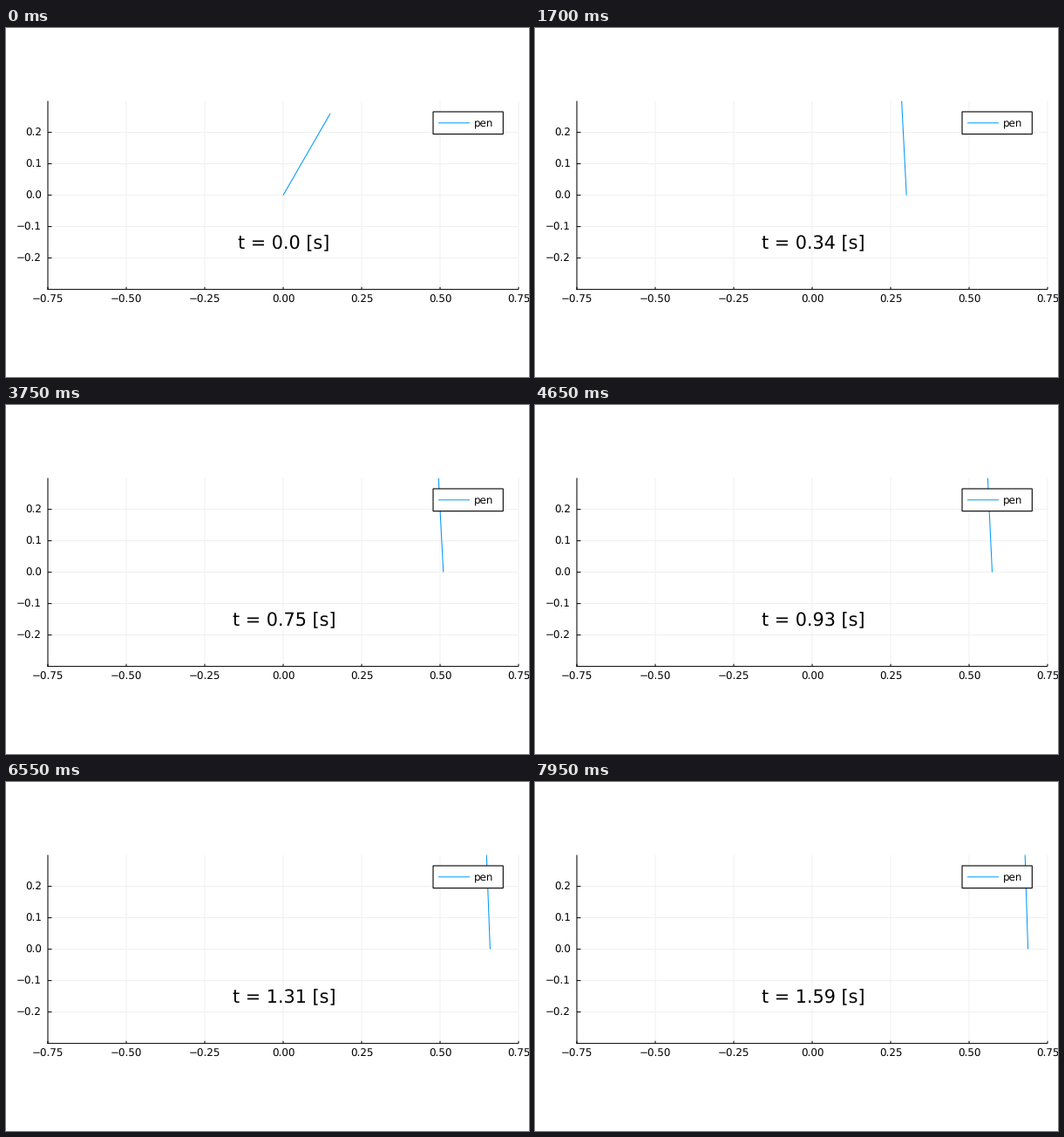
These frames come from a looping animation (600 by 400 pixels, 8000 ms). A matplotlib script:

```python
import numpy as np
import matplotlib.pyplot as plt
from matplotlib.animation import FuncAnimation
from matplotlib.patches import Rectangle

DPI = 100
PX = 72 / DPI            # one pixel in points
FRAMES, STEP_MS = 160, 50
BLUE = "#009afa"
LEFT, RIGHT, TOP, BOTTOM = 48.0, 588.0, 83.6, 299.6

# balancing cart: one slow oscillating mode plus a critically damped one
GRAVITY, LENGTH, TILT = 9.8, 0.3, np.pi / 6
SLOW = -0.40 + 0.469j
REACH = 0.052 - 1.858j
FAST = 17.2

plt.rcParams["font.family"] = "DejaVu Sans"
plt.rcParams["text.hinting"] = "none"
fig = plt.figure(figsize=(6, 4), dpi=DPI, facecolor="white")
ax = fig.add_axes([0, 0, 1, 1])
ax.set_xlim(0, 600)
ax.set_ylim(400, 0)
ax.axis("off")


def to_x(v):
    return 318 + 360 * v


def to_y(v):
    return 191.6 - 360 * v


def line(xs, ys, color="black", width=1.0, z=2):
    return ax.plot(xs, ys, color=color, lw=width * PX, zorder=z,
                   solid_capstyle="butt", snap=False)[0]


def label(x, baseline, text, size=11.9, align="center"):
    return ax.text(x, baseline, text, fontsize=size * PX, ha=align,
                   va="baseline", color="black", zorder=6)


def signed(v, digits):
    return f"{v:.{digits}f}".replace("-", "\u2212")


# grid, ticks and axis labels
for v in np.arange(-3, 4) * 0.25:
    x = to_x(v)
    line([x, x], [TOP, BOTTOM], "#f0f0f0", z=1)
    line([x, x], [BOTTOM, BOTTOM - 2.8])
    label(x + 0.1, 314.8, signed(v, 2))
for v in np.arange(-2, 3) * 0.1:
    y = to_y(v)
    line([LEFT, RIGHT], [y, y], "#f0f0f0", z=1)
    line([LEFT, LEFT + 4.5], [y, y])
    label(41, y + 4.3, signed(v, 1), align="right")
line([LEFT, LEFT], [TOP, BOTTOM + 0.5])
line([LEFT - 0.5, RIGHT], [BOTTOM, BOTTOM])

# legend
ax.add_patch(Rectangle((490, 96), 80.3, 25.6, fc="white", ec="black",
                       lw=1.1 * PX, zorder=5, snap=False))
line([496, 532], [108.8, 108.8], BLUE, z=6)
label(536.5, 113, "pen", align="left")


def slow(t, order):
    """Derivative of the slow cart path."""
    return (REACH * SLOW ** order * np.exp(SLOW * t)).real


def settle(t, gap, rate):
    """Critically damped decay of a starting gap and its rate."""
    return np.exp(-FAST * t) * (gap + (rate + FAST * gap) * t)


def state(t):
    cart = slow(t, 0) - settle(t, slow(0, 0), slow(0, 1))
    lean = slow(t, 2) / GRAVITY
    gap = TILT - slow(0, 2) / GRAVITY
    return cart, lean + settle(t, gap, -slow(0, 3) / GRAVITY)


pen = line([], [], BLUE, 1.05, z=3)
clock = label(319, 253.3, "", size=20.8)


def draw(n):
    t = n / 100
    cart, angle = state(t)
    tip_x = cart + LENGTH * np.sin(angle)
    tip_y = LENGTH * np.cos(angle)
    pen.set_data([to_x(cart), to_x(tip_x)], [to_y(0), to_y(tip_y)])
    clock.set_text(f"t = {t} [s]")
    return pen, clock


anim = FuncAnimation(fig, draw, frames=FRAMES, interval=STEP_MS,
                     repeat=True, repeat_delay=0, blit=False)
plt.show()
```
